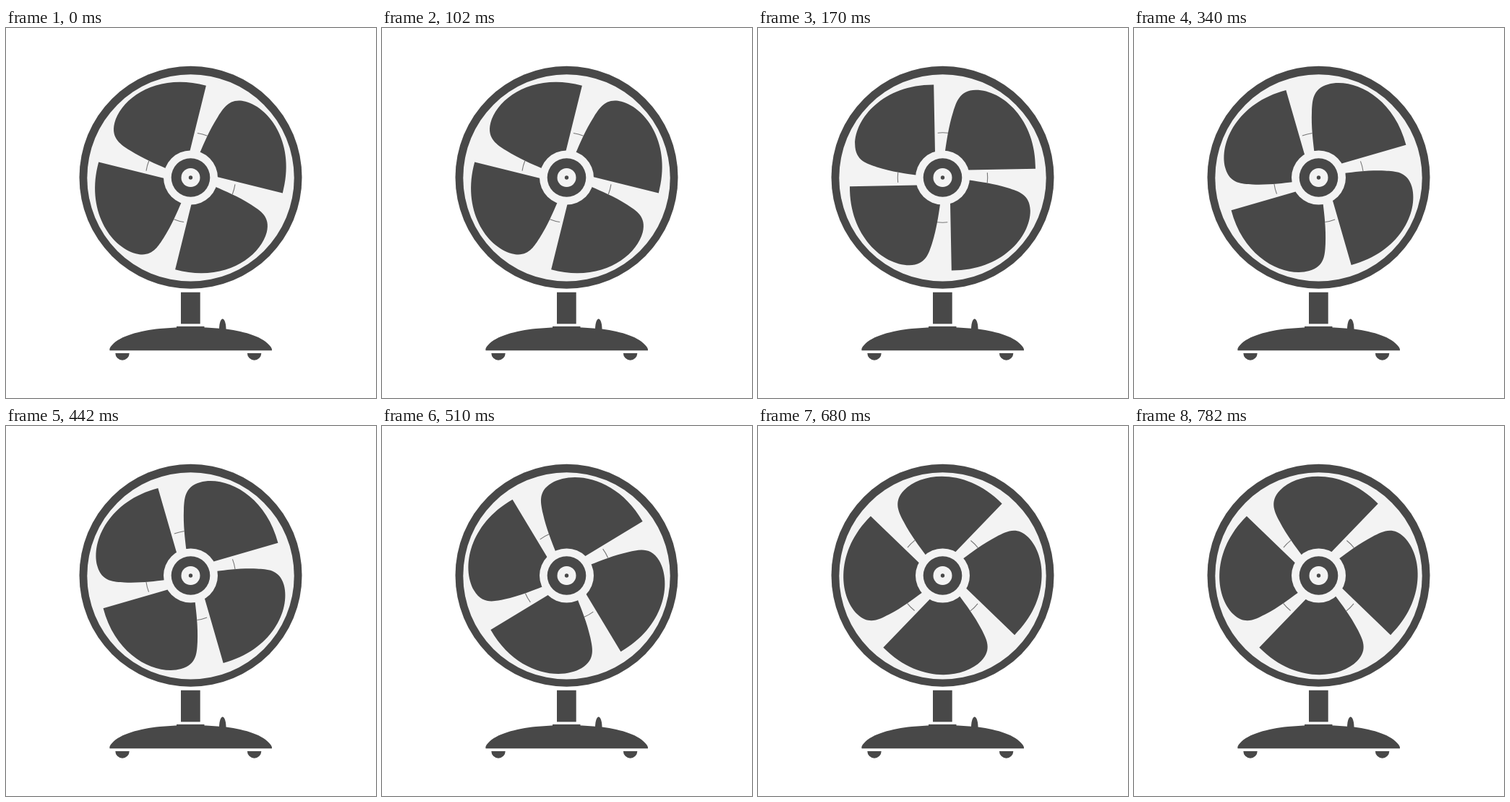
Write an HTML page with a canvas that moves like this. It is 512x512 px and loops after 850 ms.

```html
<!DOCTYPE html>
<html lang="en">
<head>
<meta charset="utf-8">
<title>Desk fan</title>
<style>
  html, body { margin: 0; width: 100%; height: 100%; overflow: hidden; background: #fff; }
  canvas { display: block; }
</style>
</head>
<body>
<canvas id="stage" width="512" height="512"></canvas>
<script>
const ctx = document.getElementById('stage').getContext('2d');
const DARK = '#484848', LIGHT = '#f3f3f3';
const CX = 255.5, CY = 207;
const STEP_MS = 170, STEPS = 5, STEP_DEG = 15, START_DEG = 15;

const blade = new Path2D(
  'M3.5 -37 C5.5 -50 8 -70 14.6 -91 C19 -104 23 -121 46 -121.3 ' +
  'C82.5 -121.3 129 -81 128.5 -12.3 L35 -10.5 L20 -20 Z');
const base = new Path2D(
  'M143.5 446.3 Q142.5 443 147 438.5 C158 426 185 419 213 416 ' +
  'Q235 414 255.5 414 Q277 414 299 416 C327 419 353 426 364 438.5 Q368.5 443 368 446.3 Z');
const knob = new Path2D('M295 417 C295 409 297 402.5 299.7 402.5 C302.5 402.5 304.5 409 304.5 417 Z');

function disc(x, y, r, color, end = Math.PI * 2) {
  ctx.fillStyle = color;
  ctx.beginPath();
  ctx.arc(x, y, r, 0, end);
  ctx.fill();
}

function drawStand() {
  ctx.fillStyle = DARK;
  ctx.fillRect(242, 365.7, 26.7, 43.7);
  ctx.fillRect(236, 412.9, 38.5, 3);
  ctx.fill(base);
  ctx.fill(knob);
  disc(161, 450, 9.7, DARK, Math.PI);
  disc(343.6, 450, 9.7, DARK, Math.PI);
}

function drawBlades(degrees) {
  ctx.save();
  ctx.translate(CX, CY);
  ctx.rotate(degrees * Math.PI / 180);
  ctx.strokeStyle = '#777';
  ctx.lineWidth = 1.1;
  for (let i = 0; i < 4; i++) {
    ctx.fillStyle = DARK;
    ctx.fill(blade);
    ctx.beginPath();
    ctx.arc(0, 0, 62.2, -Math.PI / 2 - 0.11, -Math.PI / 2 + 0.12);
    ctx.stroke();
    ctx.rotate(Math.PI / 2);
  }
  ctx.restore();
}

function draw(time) {
  const step = Math.floor(time / STEP_MS) % STEPS;
  ctx.filter = 'none';
  ctx.fillStyle = '#fff';
  ctx.fillRect(0, 0, 512, 512);
  ctx.filter = 'blur(0.5px)'; // slightly soft edges
  drawStand();
  disc(CX, CY - 0.2, 154, DARK);
  disc(CX, CY + 0.4, 143.2, LIGHT);
  drawBlades(START_DEG - step * STEP_DEG);
  disc(CX, CY, 37.5, LIGHT);
  disc(CX, CY, 26.8, DARK);
  disc(CX, CY, 13, LIGHT);
  disc(CX, CY, 2.7, DARK);
}

const start = performance.now();
function tick() {
  draw(performance.now() - start);
  requestAnimationFrame(tick);
}
tick();
</script>
</body>
</html>
```
